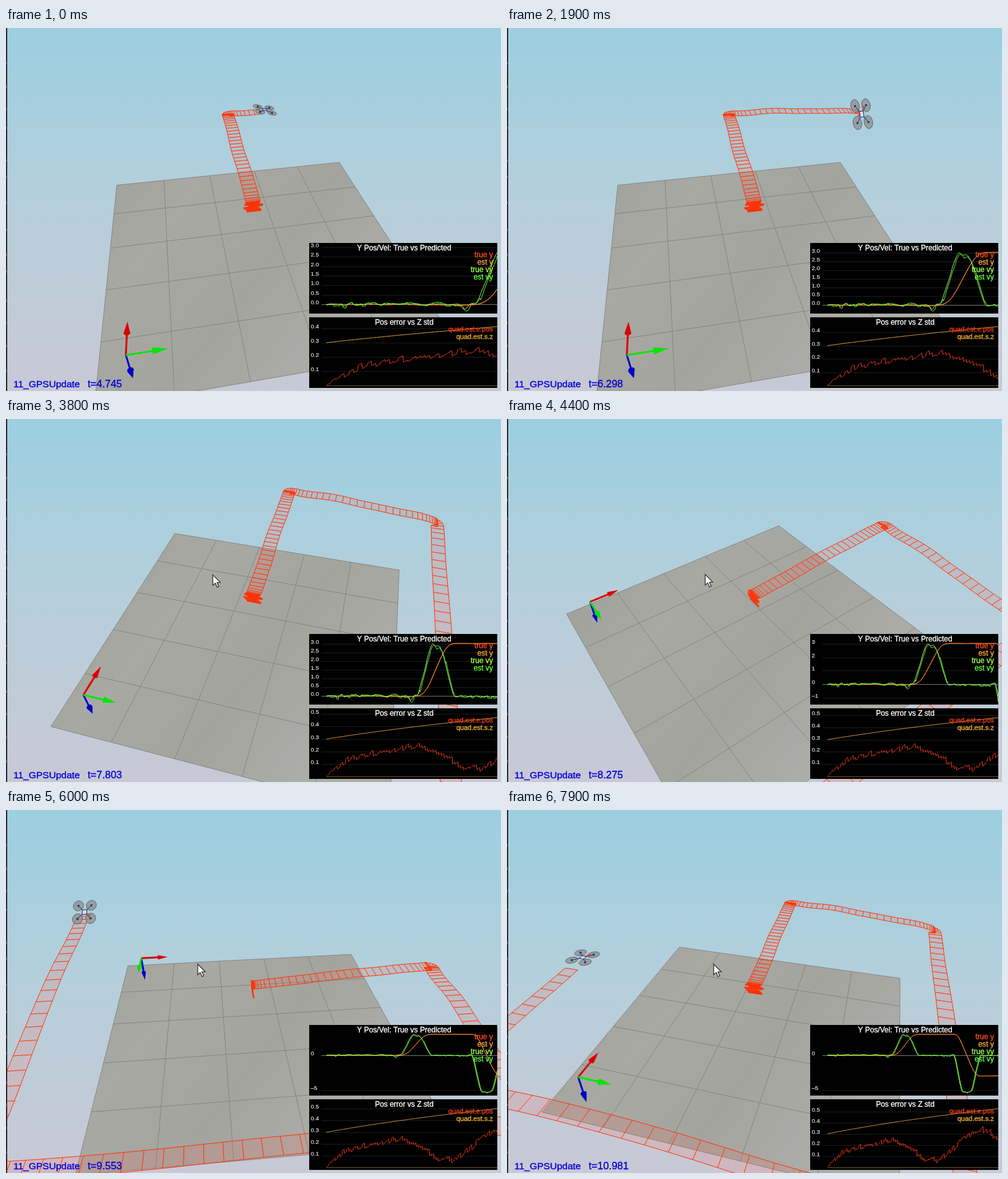
An HTML page with a canvas that plays this animation: 800x586 px, repeating every 8000 ms.

```html
<!DOCTYPE html>
<html>
<head>
<meta charset="utf-8">
<style>
html, body { margin: 0; width: 100%; height: 100%; overflow: hidden; background: #b8cfda; }
canvas { display: block; width: 800px; height: 586px; }
</style>
</head>
<body>
<canvas id="stage" width="800" height="586"></canvas>
<script>
const g = document.getElementById('stage').getContext('2d');
const LOOP = 8000, FRAME = 100, FOCAL = 707, CX = 399, CY = 293;
const FLOOR_H = -0.9, RAD = Math.PI / 180;
const FONT = '"Liberation Sans", Arial, sans-serif';

// keys: [[time, value, ...], ...], column col, linear between
function at(keys, t, col = 1) {
  if (t <= keys[0][0]) return keys[0][col];
  for (let i = 1; i < keys.length; i++) {
    const a = keys[i - 1], b = keys[i];
    if (t <= b[0]) return a[col] + (b[col] - a[col]) * (t - a[0]) / (b[0] - a[0]);
  }
  return keys[keys.length - 1][col];
}
const unit = k => Math.min(1, Math.max(0, k));
const smooth = k => { k = unit(k); return k * k * (3 - 2 * k); };
const bump = (t, c, w) => Math.exp(-(((t - c) / w) ** 2));
const hash = n => { const s = Math.sin(n * 127.1 + 11.7) * 43758.5453; return (s - Math.floor(s)) * 2 - 1; };
const noise = t => { const i = Math.floor(t); return hash(i) + (hash(i + 1) - hash(i)) * smooth(t - i); };

// ---- flight: each leg speeds up over rise, cruises until hold, slows over fall ----
const LEGS = [
  { axis: 0, start: 2.1, dist: 2.95, rise: .5, hold: 1.2, fall: .6 },
  { axis: 1, start: 4.05, dist: 3, rise: .85, hold: 1.05, fall: .8 },
  { axis: 0, start: 6.15, dist: -6.15, rise: .35, hold: 1.35, fall: .5 },
  { axis: 1, start: 8.06, dist: -6, rise: .65, hold: 1.08, fall: .75 },
  { axis: 0, start: 10.1, dist: 6, rise: .35, hold: 1.35, fall: .5 }
];
const ramp = (u, w) => { const k = unit(u / w); return w * (k ** 3 - k ** 4 / 2) + Math.max(0, u - w); };
const total = (axis, fn) => LEGS.reduce((sum, l) => l.axis === axis ? sum + fn(l) : sum, 0);
const peak = l => l.dist / (l.hold + (l.fall - l.rise) / 2);
const place = (axis, t) => total(axis, l => peak(l) * (ramp(t - l.start, l.rise) - ramp(t - l.start - l.hold, l.fall)));
const speed = (axis, t) => total(axis, l => peak(l) * (smooth((t - l.start) / l.rise) - smooth((t - l.start - l.hold) / l.fall)));
const height = t => -.04 + .18 * smooth(t / 2) + .17 * smooth((t - 2.2) / 1.4) - .24 * smooth((t - 4.6) / 1.4)
  - .06 * bump(t, 7.6, .4) + .22 * smooth((t - 8.5) / .6);
const heading = t => LEGS.slice(1).reduce((sum, l) => sum + 90 * smooth((t - l.start + .05) / .25), 0) * RAD;
function pose(t) {
  const sway = t < 2 ? .05 : .015;
  return [place(0, t) + .02 * noise(t * 4 + 40), place(1, t) + sway * noise(t * 3), height(t) + .01 * noise(t * 5 + 90)];
}

// ---- clock and camera keys: [ms, simulated seconds], [ms, azimuth, elevation] ----
const SIM = [[0, 4.745], [1000, 5.58], [2900, 7.095], [4400, 8.275], [5300, 9.005], [6800, 10.18], [7900, 10.981]];
const ORBIT = [[2950, -10.6, 38], [3700, 8, 45.5], [4400, 54.5, 43.5], [5300, 104.8, 37.5], [6800, 60.9, 32.8], [7900, 15.3, 35.3]];
let cam;
function setCamera(ms) {
  const az = at(ORBIT, ms), el = at(ORBIT, ms, 2);
  cam = { az, el, ca: Math.cos(az * RAD), sa: Math.sin(az * RAD), ce: Math.cos(el * RAD), se: Math.sin(el * RAD),
    dist: 7.25 - .25 * bump(ms, 4900, 700) };
}
function project([x, y, h]) {
  const f = x * cam.ca - y * cam.sa, r = x * cam.sa + y * cam.ca;
  const k = FOCAL / (cam.dist + f * cam.ce - h * cam.se);
  return [CX + r * k, CY - (f * cam.se + h * cam.ce) * k];
}
function trace(points, close) {
  points.forEach((p, i) => { const q = project(p); i ? g.lineTo(...q) : g.moveTo(...q); });
  if (close) g.closePath();
}
function shape(points, fill, stroke) {
  g.beginPath();
  trace(points, true);
  if (fill) { g.fillStyle = fill; g.fill(); }
  if (stroke) { g.strokeStyle = stroke; g.stroke(); }
}
function segment(a, b, color, width) {
  g.beginPath();
  trace([a, b]);
  g.strokeStyle = color;
  g.lineWidth = width;
  g.stroke();
}
// n points round a circle, each mapped by fn(cos, sin)
const circle = (n, fn) => Array.from({ length: n }, (_, i) => fn(Math.cos(i * 2 * Math.PI / n), Math.sin(i * 2 * Math.PI / n)));
function gradient(x0, y0, x1, y1, ...colors) {
  const fill = g.createLinearGradient(x0, y0, x1, y1);
  colors.forEach((c, i) => fill.addColorStop(i / (colors.length - 1), c));
  return fill;
}

// ---- scene ----
function drawSky() {
  g.fillStyle = gradient(0, 0, 0, 586, '#9ccfe0', '#b6cfdb', '#c9c8d5');
  g.fillRect(0, 0, 800, 586);
}
function drawFloor() {
  const s = 2.5, z = FLOOR_H, line = '#858581';
  g.lineWidth = 1;
  shape([[-s, -s, z], [s, -s, z], [s, s, z], [-s, s, z]],
    gradient(100, 250, 500, 560, '#a0a09b', '#a9a9a4', '#a4a49f', '#acaca8'), line);
  for (let i = -1.5; i <= 1.5; i++) {
    segment([i, -s, z], [i, s, z], line, 1);
    segment([-s, i, z], [s, i, z], line, 1);
  }
}
function drawRibbon(now) {
  const rungs = [];
  for (let t = .1; t < now - .04; t += .05) {
    const [x, y, h] = pose(t), a = heading(t), dx = -.12 * Math.sin(a), dy = .12 * Math.cos(a);
    rungs.push([[x - dx, y - dy, h], [x + dx, y + dy, h]]);
  }
  const left = rungs.map(r => r[0]), right = rungs.map(r => r[1]);
  g.beginPath();
  for (let i = 1; i < rungs.length; i++) trace([left[i - 1], left[i], right[i], right[i - 1]], true);
  g.fillStyle = 'rgba(255,90,70,.15)';
  g.fill();
  g.beginPath();
  trace(left);
  trace(right);
  rungs.forEach(r => trace(r));
  g.strokeStyle = '#ff3206';
  g.lineWidth = 1;
  g.stroke();
}
function drawAxes() {
  const o = [-2.1, -2.05, -.46];
  const along = (axis, d, u = 0, v = 0) => {
    const p = o.slice();
    p[axis] += axis === 2 ? -d : d;
    p[(axis + 1) % 3] += u;
    p[(axis + 2) % 3] += v;
    return p;
  };
  [[2, '#0000c8'], [0, '#dc0000'], [1, '#00e600']].forEach(([axis, color]) => {
    segment(o, along(axis, .36), color, 3);
    const tip = along(axis, .53), ring = circle(12, (c, s) => along(axis, .34, .042 * c, .042 * s));
    shape(ring, color);
    ring.forEach((p, i) => shape([p, ring[(i + 1) % 12], tip], color));
  });
}
function drawDrone(t) {
  const [x, y, h] = pose(t), e = .04, arm = .13, r = .1, b = .045;
  const [ax, ay] = [0, 1].map(i => (speed(i, t + e) - speed(i, t - e)) / (2 * e));
  const local = (u, v) => [x + u, y + v, h + .03 - (u * ax + v * ay) / 16];
  const corners = [[-1, -1], [1, -1], [1, 1], [-1, 1]];
  g.lineWidth = 1;
  corners.forEach(([u, v]) => {
    shape(circle(24, (c, s) => local(u * arm + r * c, v * arm + r * s)), 'rgba(142,146,154,.8)', '#5c6068');
    const q = project(local(u * arm, v * arm));
    g.fillStyle = '#26283a';
    g.fillRect(q[0] - 1.5, q[1] - 1.5, 3, 3);
  });
  segment(local(-arm, -arm), local(arm, arm), '#4a4c58', 1.2);
  segment(local(-arm, arm), local(arm, -arm), '#4a4c58', 1.2);
  segment(local(0, 0), local(arm, arm * .6), '#e04020', 1.4);
  g.lineWidth = 1;
  shape(corners.map(([u, v]) => local(u * b, v * b)), '#dcdcec', '#1c1c78');
}

// ---- plots ----
const vyTrue = t => speed(1, t) + .09 * noise(t * 6) * smooth(t * 9) - .2 * bump(t, 3.85, .13) + .11 * bump(t, 3.15, .25);
const vyEst = t => vyTrue(t - .04) - .03 + .09 * hash(Math.floor(t * 11) + 300) * smooth(t * 5) - .1 * bump(t, 5, .3);
const yTrue = t => place(1, t) - .03 * bump(t, 3, .8);
const yEst = t => yTrue(t) + .04 * noise(t * 3 + 70);
const sigma = t => Math.sqrt(.09 + .017 * t);
const drift = t => .215 * (1 - Math.exp(-t / 1.1)) + .035 * bump(t, 4, .5) - .16 * bump(t, 6.7, 1.5)
  + .11 * smooth((t - 7.5) / 2.2) - .07 * smooth((t - 10));
function posErr(t) {
  const i = Math.floor(t * 8), k = i / 8;
  return Math.max(0, drift(k) + .025 * hash(i + 50) * smooth(t * 2) + .15 * (t - k));
}

function label(text, x, y, size, color, align = 'left', weight = .35) {
  g.font = size + 'px ' + FONT;
  g.textAlign = align;
  g.fillStyle = g.strokeStyle = color;
  g.lineWidth = weight;
  g.fillText(text, x, y);
  g.strokeText(text, x, y);
}
function hline(x, y, color) {
  g.fillStyle = color;
  g.fillRect(x, Math.round(y), 794 - x, 1);
}
function drawPlot(top, title, now, series, floorAtZero) {
  const bottom = top + 110, span = 95;
  let lo = 0, hi = 0;
  const curves = series.map(([name, color, fn]) => {
    const pts = [];
    for (let t = 0; t < now; t += .02) pts.push([t, fn(t)]);
    pts.push([now, fn(now)]);
    pts.forEach(p => { lo = Math.min(lo, p[1]); hi = Math.max(hi, p[1]); });
    return { color, pts };
  });
  const range = hi - lo, py = v => bottom - (v - lo) / range * span;
  const tick = range < .7 ? .1 : range < 3.6 ? .5 : range < 6 ? 1 : 5;
  g.save();
  g.beginPath();
  g.rect(490, top, 304, 114);
  g.clip();
  g.fillStyle = '#000';
  g.fillRect(490, top, 304, 114);
  for (let i = Math.ceil(lo / tick); i * tick < hi + tick; i++) {
    const v = i * tick, y = py(v);
    if (y < top + 5 || floorAtZero && i === 0) continue;
    hline(510, y, i ? '#1c1c1c' : '#777');
    label(v.toFixed(tick < 1 ? 1 : 0).replace('-', '–'), 492.5, y, 9.5, '#e6e6e6', 'left', .2);
  }
  if (floorAtZero) hline(518, bottom, '#6a5a28');
  curves.forEach(({ color, pts }) => {
    g.beginPath();
    pts.forEach(([t, v]) => g.lineTo(518 + t / now * 276, py(v)));
    g.strokeStyle = color;
    g.lineWidth = 1;
    g.stroke();
  });
  label(title, 643.5, top + 12, 12, '#fff', 'center');
  series.forEach(([name, color], i) => label(name, 787, top + 23 + i * 12, floorAtZero ? 11 : 12, color, 'right'));
  g.restore();
}

// ---- overlay ----
function drawCursor() {
  g.save();
  g.translate(339.4 - .35 * cam.az, 239.4 + .27 * cam.el);
  g.beginPath();
  [[0, 0], [0, 17], [4, 13.4], [7, 20], [9.7, 18.8], [6.8, 12.4], [12, 12]].forEach(p => g.lineTo(...p));
  g.closePath();
  g.fillStyle = '#fff';
  g.fill();
  g.strokeStyle = '#333';
  g.lineWidth = 1.3;
  g.stroke();
  g.restore();
}
function drawEdge() {
  g.fillStyle = '#2b2c30';
  g.fillRect(0, 0, 2, 586);
  for (let i = 0; i < 14; i++) {
    g.fillStyle = i === 1 ? '#a08a30' : '#77797e';
    g.fillRect(0, 52 + i * 38 + Math.round(8 * hash(i)), 1, 4);
  }
}

function draw(ms) {
  const now = at(SIM, ms);
  setCamera(ms);
  drawSky();
  drawFloor();
  drawRibbon(now);
  drawAxes();
  drawDrone(now);
  drawPlot(347, 'Y Pos/Vel: True vs Predicted', now, [
    ['true y', '#ff4a1c', yTrue], ['est y', '#ffa63c', yEst],
    ['true vy', '#a4ff50', vyTrue], ['est vy', '#62ff3c', vyEst]]);
  drawPlot(467, 'Pos error vs Z std', now, [
    ['quad.est.e.pos', '#f03a1c', posErr], ['quad.est.s.z', '#f0b030', sigma]], true);
  label('11_GPSUpdate', 12, 580, 15.5, '#0000dc');
  label('t=' + now.toFixed(3), 132, 580, 16.5, '#0000dc');
  if (ms >= 3000) drawCursor();
  drawEdge();
}

const start = performance.now();
function tick() {
  const ms = (performance.now() - start) % LOOP;
  draw(Math.floor(ms / FRAME) * FRAME);
  requestAnimationFrame(tick);
}
tick();
</script>
</body>
</html>
```
